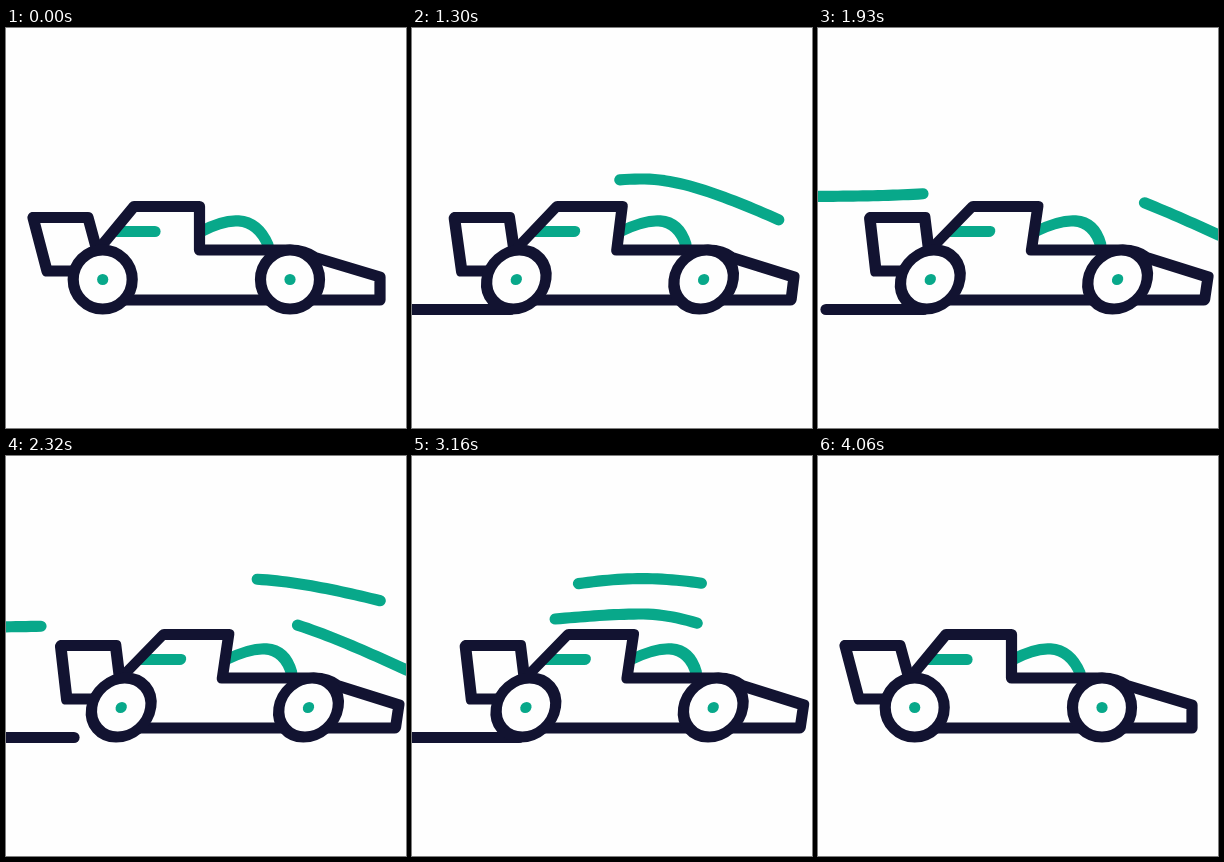
Recreate the animation shown at these times as an HTML page. Size 400 px wide and 400 px high, loop 4090 ms.

```html
<!DOCTYPE html>
<html lang="en">
<head>
<meta charset="utf-8">
<title>Race car</title>
<style>
  html, body { margin: 0; width: 100%; height: 100%; overflow: hidden; background: #fefefe; }
  svg { display: block; width: 100%; height: 100%; }
  path, circle { fill: none; stroke: #121331; stroke-width: 11.2; stroke-linecap: round; stroke-linejoin: round; }
  .teal { stroke: #08a88a; }
  .wheel { fill: #fefefe; }
  .hub { fill: #08a88a; stroke: none; }
</style>
</head>
<body>
<svg viewBox="0 0 400 400">
  <path id="wind" class="teal"/>
  <path id="trail"/>
  <g id="car">
    <path class="teal" d="M111 203.5H149"/>
    <path class="teal" d="M194 204C220 190 248 184 262 217"/>
    <path d="M66 243H41L27 189.5H82L90 219"/>
    <path d="M94.5 219L128 178.5H193.5V222H284Q299 222 309 229.5L374 249V272H97"/>
    <circle class="wheel" cx="96.7" cy="251.5" r="29.5"/>
    <circle class="wheel" cx="284" cy="251.5" r="29.5"/>
    <circle class="hub" cx="96.7" cy="251.5" r="5.6"/>
    <circle class="hub" cx="284" cy="251.5" r="5.6"/>
  </g>
</svg>
<script>
const LOOP = 4090, START = 1000, END = 4060;
const GROUND = 286.5, ENTRY = 406, PEAK_X = 230;
const [wind, trail, car] = ['wind', 'trail', 'car'].map(id => document.getElementById(id));

const ramp = (t, a, b) => Math.min(1, Math.max(0, (t - a) / (b - a)));
const smooth = u => u * u * (3 - 2 * u);

// The car creeps forward and back, leaning while it is under way.
const shift = t => 14.2 * Math.sin(Math.PI * ramp(t, START, END) ** 1.12);
const lean = t => .147 * (smooth(ramp(t, START, 1400)) - smooth(ramp(t, 3300, 4000)));

// Air path: a bent slope in front of the crest, settling to a level behind it.
const airPath = (crest, drop, slope, bend) => x => {
  const d = x - PEAK_X;
  return crest + (d > 0
    ? slope * (Math.hypot(d, bend) - bend)
    : drop * (1 - Math.exp(-((d / 108) ** 2))));
};
const high = airPath(122.6, 17, .31, 110);
const mid = airPath(151, 20, .5, 74);
const low = airPath(158, 10.5, .5, 74);

// Gusts enter at the right edge and take `span` ms to pass it.
const gust = (curve, enter, span, speed = 1.06) => ({ curve, enter, span, speed });
const gusts = [gust(mid, 1113, 150), gust(mid, 1855, 115), gust(mid, 2601, 111), gust(mid, 3331, 111, .79)];
for (let k = 0; k < 3; k++) {
  gusts.push(gust(high, 1414 + 760 * k, 116), gust(low, 1512 + 700 * k, 134));
}

// Ground dashes slide left together; each ends one gap before the next begins.
const GAP = 56, DASH_SPEED = .6, DASH_TIME = 1540;
const heads = [-218, ...Array.from({ length: 6 }, (_, k) => 67 + 175 * k), 1260];

function gustPath(t, { curve, enter, span, speed }) {
  const head = ENTRY - speed * (t - enter);
  const a = Math.max(head, -20), b = Math.min(head + speed * span, 420);
  if (a >= b) return '';
  const n = Math.ceil((b - a) / 5);
  let d = '';
  for (let i = 0; i <= n; i++) {
    const x = a + (b - a) * i / n;
    d += `${i ? 'L' : 'M'}${x.toFixed(2)} ${curve(x).toFixed(2)}`;
  }
  return d;
}

function dashPath(t, wheelX, head, next) {
  const move = DASH_SPEED * (t - DASH_TIME);
  const a = Math.max(head - move, -20), b = Math.min(next - GAP - move, wheelX);
  return a < b ? `M${a} 281.5H${b}` : '';
}

function draw(now) {
  const t = now % LOOP, s = shift(t), k = lean(t);
  car.setAttribute('transform', `matrix(1 0 ${-k} 1 ${s + k * GROUND} 0)`);
  wind.setAttribute('d', gusts.map(g => gustPath(t, g)).join(''));
  trail.setAttribute('d', heads.slice(1).map((next, i) => dashPath(t, 95 + s, heads[i], next)).join(''));
}

let start;
function tick(now) {
  start ??= now;
  draw(now - start);
  requestAnimationFrame(tick);
}
draw(0);
requestAnimationFrame(tick);
</script>
</body>
</html>
```
